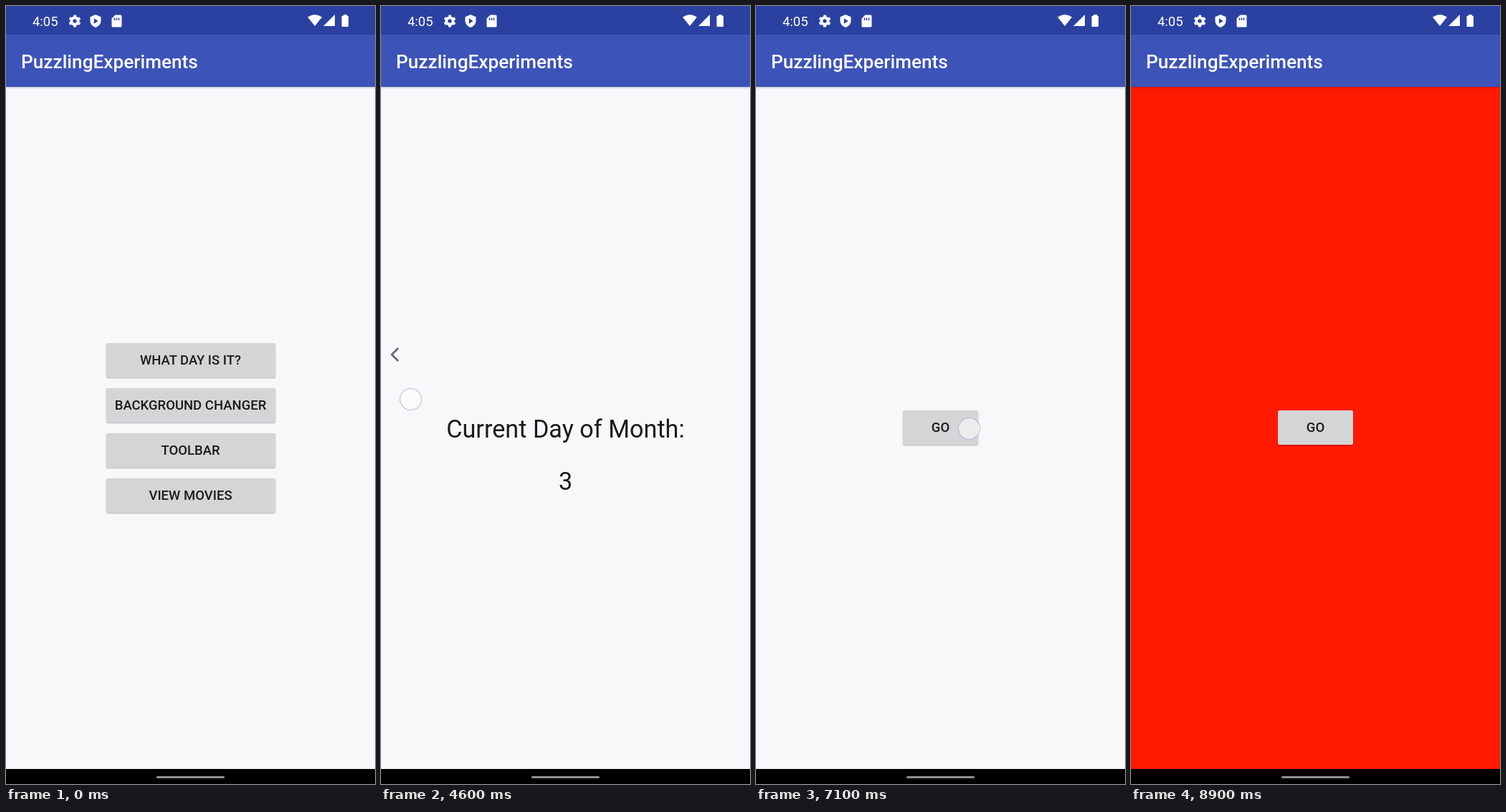
Animation, 515 px wide and 1087 px high, one loop 9000 ms. Source, as an HTML page:

```html
<!DOCTYPE html>
<html lang="en">
<head>
<meta charset="utf-8">
<title>Screen walkthrough</title>
<style>
  html, body { margin: 0; width: 515px; height: 1087px; overflow: hidden; background: #000; }
  body { position: relative; font-family: Roboto, sans-serif; color: #1b1a1d; }
  body *, .screen { position: absolute; box-sizing: border-box; white-space: nowrap; }
  .screen, #scrim, svg { left: 0; top: 0; width: 515px; height: 1087px; }
  .screen { background: #f8f7fa; overflow: hidden; }
  .status { width: 100%; height: 40px; background: #2b41a2; }
  .bar { top: 40px; width: 100%; height: 73px; padding-left: 21px; background: #3c53b8;
    color: #fff; font: 500 26.2px/76px Roboto, sans-serif; box-shadow: 0 1px 3px rgba(0,0,0,.25); }
  .nav { top: 1066px; width: 100%; height: 21px; background: #000; }
  .btn { height: 48px; border-radius: 2.5px; background-color: #d4d5d6; text-align: center;
    font: 500 18.5px/49px Roboto, sans-serif; box-shadow: 0 1px 2px rgba(0,0,0,.28); }
  .big { width: 100%; text-align: center; font-size: 34.2px; line-height: 40px; }
  #scrim { background: rgba(0,0,0,.065); }
  #dot { width: 31px; height: 31px; margin: -15.5px; border-radius: 50%;
    background: rgba(255,255,255,.55); border: 1.5px solid rgba(145,155,195,.65); }
  #pill { left: 210px; top: 1076px; width: 95px; height: 3px; border-radius: 2px; background: rgba(255,255,255,.57); }
</style>
</head>
<body>
<div id="menu" class="screen"></div>
<div id="scrim"></div>
<div id="day" class="screen">
  <div class="big" style="top:571px">Current Day of Month:</div>
  <div class="big" style="top:644px">3</div>
</div>
<div id="color" class="screen"></div>
<svg viewBox="0 0 515 1087" fill="#fff">
  <text x="37" y="27.5" font-size="18.4">4:05</text>
  <g fill="none" stroke="#fff" transform="rotate(15.3 96 21)">
    <circle cx="96" cy="21" r="4.7" stroke-width="4"/>
    <circle cx="96" cy="21" r="7" stroke-width="3" stroke-dasharray="3.6 3.73"/>
  </g>
  <path fill-rule="evenodd" d="M125 12l7.5 3.3v5.2c0 4.5-3.2 8-7.5 9.5-4.3-1.5-7.5-5-7.5-9.5v-5.2zM122.8 17.3v7.4l5.8-3.7z"/>
  <path d="M152.5 12.5h7.5q1.5 0 1.5 1.5v14q0 1.5-1.5 1.5h-11q-1.5 0-1.5-1.5v-10.5z"/>
  <path d="M151.5 16.5v3.5m3-3.5v3.5m3-3.5v3.5" stroke="#2b41a2" stroke-width="1.5"/>
  <path d="M431 28L421 15.6q10-7 20 0zM459 12v16h-16zM471 12h5v1.7h1q1 0 1 1v13.3q0 1-1 1h-7.500q-1 0-1-1v-13.300q0-1 1-1h1.500z"/>
  <path id="arrow" d="M24 478l-9 9 9 9" fill="none" stroke="#606268" stroke-width="2.5"/>
</svg>
<div id="pill"></div>
<div id="dot"></div>
<script>
const $ = id => document.getElementById(id);
const menu = $('menu'), day = $('day'), color = $('color');
const clamp = v => Math.max(0, Math.min(1, v));

for (const screen of [menu, day, color]) {
  screen.insertAdjacentHTML('beforeend',
    '<div class="status"></div><div class="bar">PuzzlingExperiments</div><div class="nav"></div>');
}

function addButton(screen, label, x, y, w) {
  const button = document.createElement('div');
  button.className = 'btn';
  button.textContent = label;
  button.style.cssText = `left:${x}px;top:${y}px;width:${w}px`;
  screen.append(button);
  return { el: button, x, y };
}

const buttons = ['WHAT DAY IS IT?', 'BACKGROUND CHANGER', 'TOOLBAR', 'VIEW MOVIES']
  .map((label, i) => addButton(menu, label, 139.5, 471 + i * 63, 236));
const go = addButton(color, 'GO', 205, 565, 105);

// Each tap: start, length, position, pressed button
const taps = [
  { start: 1900, hold: 300, x: 201, y: 494, button: buttons[0] },
  { start: 5900, hold: 300, x: 250, y: 560, button: buttons[1] },
  ...[7100, 7700, 8300].map(start => ({ start, hold: 300, x: 297, y: 590, button: go }))
];

const bezier = (a, b, c, d, u) =>
  a * (1 - u) ** 3 + 3 * b * u * (1 - u) ** 2 + 3 * c * u * u * (1 - u) + d * u ** 3;

// Fast out, extra slow in: two joined cubic curves
function ease(x) {
  const [xs, ys] = x < 1 / 6
    ? [[0, .05, .1333, 1 / 6], [0, 0, .06, .4]]
    : [[1 / 6, .2083, .25, 1], [.4, .82, 1, 1]];
  let lo = 0, hi = 1;
  for (let i = 0; i < 24; i++) {
    const mid = (lo + hi) / 2;
    if (bezier(...xs, mid) < x) lo = mid; else hi = mid;
  }
  return bezier(...ys, lo);
}

function place(screen, scale, alpha = 1) {
  screen.style.visibility = 'visible';
  screen.style.opacity = alpha;
  screen.style.transform = scale === 1 ? 'none' : `scale(${scale})`;
}

function open(screen, age) {
  const p = ease(clamp(age / 400)), moving = age >= 0 && age < 400;
  if (age < 400) place(menu, 1 + .05 * (age > 0 ? p : 0));
  if (age > 0) place(screen, .85 + .15 * p, clamp((age - 50) / 50));
  $('scrim').style.visibility = moving && age > 0 ? 'visible' : 'hidden';
}

function drawScreens(t) {
  for (const screen of [menu, day, color]) screen.style.visibility = 'hidden';
  if (t < 5200) open(day, t - 2200);
  else if (t < 5900) {
    $('scrim').style.visibility = 'hidden';
    place(menu, 1.1 - .1 * ease(clamp((t - 5058) / 400)));
  } else open(color, t - 6200);
  color.style.backgroundColor = t < 7300 ? '#f8f7fa' : t >= 7900 && t < 8500 ? '#0b00fb' : '#ff1a00';
}

function drawTaps(t) {
  let dot = null;
  for (const { el } of [...buttons, go]) el.style.backgroundImage = el.style.boxShadow = '';
  for (const { start, hold, x, y, button } of taps) {
    const age = t - start;
    if (age < 0 || age >= 600) continue;
    if (age < hold) dot = [x, y];
    if (age < 100) continue;
    const radius = button === go && age < 300 ? age * .42 - 12 : 300;
    const ink = `rgba(0,0,0,${.125 * clamp((600 - age) / 300)})`;
    button.el.style.backgroundImage = `radial-gradient(circle at ${x - button.x}px ${y - button.y}px, ` +
      `${ink} ${radius}px, transparent ${radius + 35}px)`;
    if (button !== go) button.el.style.boxShadow = '0 2px 4px rgba(0,0,0,.35)';
  }
  // Back swipe from the left edge
  if (t >= 4400 && t < 5100) dot = [4 + 150 * clamp((t - 4500) / 400), 549];
  $('arrow').style.visibility = t >= 4600 && t < 5100 ? 'visible' : 'hidden';
  $('dot').style.visibility = dot ? 'visible' : 'hidden';
  if (dot) [$('dot').style.left, $('dot').style.top] = dot.map(v => v + 'px');
}

const begin = performance.now();
function frame() {
  const t = Math.floor((performance.now() - begin) % 9000 / 100) * 100;
  drawScreens(t);
  drawTaps(t);
  requestAnimationFrame(frame);
}
frame();
</script>
</body>
</html>
```
